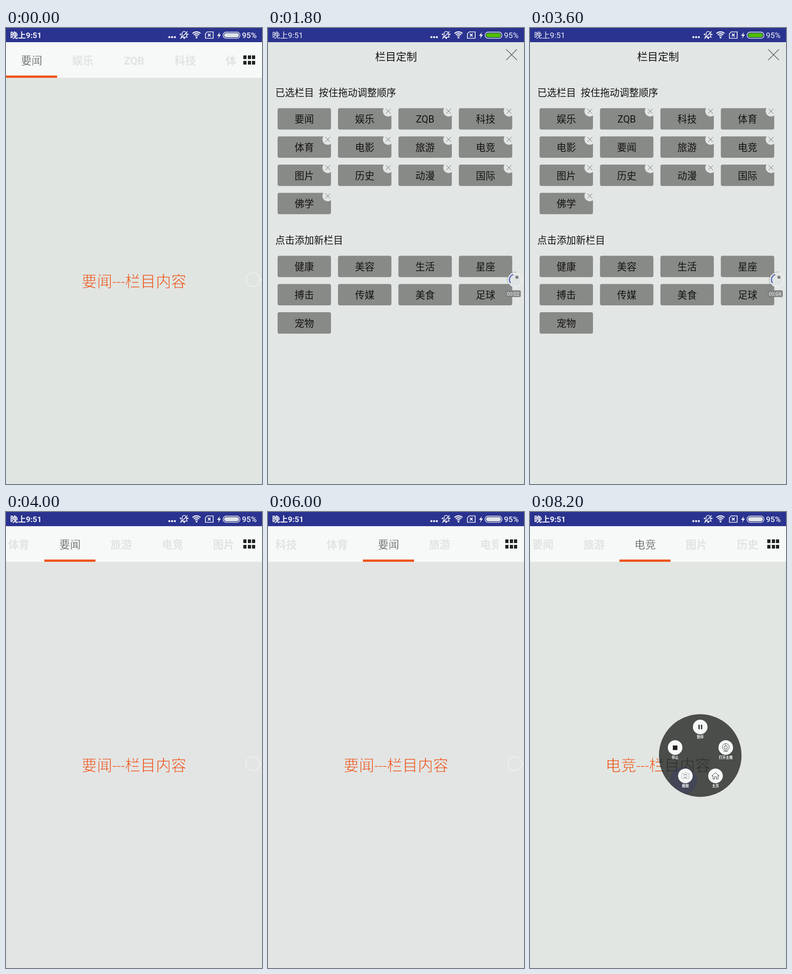
Animation of 561 by 998 pixels, one loop 8.4 s. Source, as an HTML page with a canvas:

```html
<!DOCTYPE html>
<html lang="zh-CN">
<head>
<meta charset="utf-8">
<title>栏目定制</title>
<style>
html, body { margin: 0; width: 100%; height: 100%; overflow: hidden; background: #e1e6e2; }
canvas { display: block; width: 561px; height: 998px; }
</style>
</head>
<body>
<canvas id="stage"></canvas>
<script>
const W = 561, H = 998, LOOP = 8400, STEP = 200;
const FONT = 'Roboto, "Noto Sans CJK SC", "Noto Sans CJK", sans-serif';
const ORANGE = '#ef551a', NAVY = '#2a338f', TILE = '#888a87', PANEL = '#e2e6e4', HEADER = '#f6f9f8';
const TAB = W / 5, STRIP = 505;

const chosen = '要闻 娱乐 ZQB 科技 体育 电影 旅游 电竞 图片 历史 动漫 国际 佛学'.split(' ');
const extra = '健康 美容 生活 星座 搏击 传媒 美食 足球 宠物'.split(' ');
const MOVED = chosen[0], REMOVED = chosen[5], DROP = 5;
const sorted = [...chosen.slice(1, DROP + 1), MOVED, ...chosen.slice(DROP + 1)];
const trimmed = sorted.filter(n => n !== REMOVED);

// [time, tab index] of each tab selection after the panel closes
const picks = [[4100, 4], [4750, 3], [5350, 2], [5843, 4], [6300, 5], [6700, 6]];

const canvas = document.getElementById('stage');
const dpr = window.devicePixelRatio || 1;
canvas.width = W * dpr;
canvas.height = H * dpr;
const c = canvas.getContext('2d');

const clamp = x => Math.max(0, Math.min(1, x));
const easeOut = x => 1 - (1 - clamp(x)) ** 3;
const smooth = x => (1 - Math.cos(Math.PI * clamp(x))) / 2;
const mix = (a, b, k) => a + (b - a) * k;

function rect(x, y, w, h, fill) {
  c.fillStyle = fill;
  c.fillRect(x, y, w, h);
}

function round(x, y, w, h, r, fill) {
  c.beginPath();
  c.roundRect(x, y, w, h, r);
  c.fillStyle = fill;
  c.fill();
}

function disc(x, y, r, fill) {
  c.beginPath();
  c.arc(x, y, r, 0, 7);
  c.fillStyle = fill;
  c.fill();
}

function ring(x, y, r, color, width = 1, from = 0, to = 2 * Math.PI) {
  c.beginPath();
  c.arc(x, y, r, from, to);
  c.strokeStyle = color;
  c.lineWidth = width;
  c.stroke();
}

function trace(points, close) {
  c.beginPath();
  points.forEach(([x, y]) => c.lineTo(x, y));
  if (close) c.closePath();
}

function line(points, color, width = 1, close) {
  trace(points, close);
  c.strokeStyle = color;
  c.lineWidth = width;
  c.stroke();
}

function cross(x, y, r, color, width) {
  line([[x - r, y - r], [x + r, y + r]], color, width);
  line([[x + r, y - r], [x - r, y + r]], color, width);
}

// y is the middle of the glyphs
function text(str, x, y, size, color, weight = 400, align = 'center') {
  c.font = `${weight} ${size}px ${FONT}`;
  c.textAlign = align;
  c.fillStyle = color;
  c.fillText(str, x, y + size * 0.37);
}

// thins the strokes by outlining them in the background colour
function thinText(str, x, y, size, color, bg) {
  text(str, x, y, size, color);
  c.strokeStyle = bg;
  c.lineWidth = size * 0.025;
  c.lineJoin = 'round';
  c.strokeText(str, x, y + size * 0.37);
  c.lineJoin = 'miter';
}

function statusIcons(green) {
  const ink = '#f1f3f7', weight = green ? 400 : 700;
  text('晚上9:51', 9, 15.5, 17.3, ink, weight, 'left');
  for (const x of [358, 364, 370]) disc(x, 20, 2.3, ink);

  c.beginPath();
  c.moveTo(384, 20);
  c.quadraticCurveTo(386, 18, 386, 13);
  c.arc(390.5, 12, 4.5, Math.PI, 0);
  c.quadraticCurveTo(395, 18, 397, 20);
  c.closePath();
  c.strokeStyle = ink;
  c.lineWidth = 1.6;
  c.stroke();
  disc(390.5, 22, 2, ink);
  line([[382, 23.5], [398, 7.5]], ink, 1.7);
  disc(382.5, 14, 1.8, ink);
  disc(398, 14, 1.8, ink);

  for (const r of [4.5, 8.5, 12.5]) ring(417.5, 21, r, ink, 2.3, -2.35, -0.8);
  disc(417.5, 21, 2, ink);

  line([[441, 8.5], [454, 8.5], [454, 22.5], [437, 22.5], [437, 12.5]], ink, 1.7, true);
  cross(445.5, 15.5, 3, ink, 2);

  trace([[469, 9], [462.5, 17], [466.5, 17], [464.5, 23.5], [471, 14.5], [467, 14.5]], true);
  c.fillStyle = ink;
  c.fill();

  c.beginPath();
  c.roundRect(475.7, 9, 37, 13.6, 6.5);
  c.strokeStyle = ink;
  c.lineWidth = 1.4;
  c.stroke();
  round(478, 11.2, 32.4, 9.2, 4.5, green ? '#4fbd00' : '#e1e5e6');
  text('95%', 517, 15.5, 17.3, ink, green ? 400 : 500, 'left');
}

function contentText(name, color, bg) {
  thinText(name + '---栏目内容', W / 2, 555, 33.7, color, bg);
}

function mainPage(tabs, index, scroll, bg) {
  rect(0, 0, W, H, bg);
  rect(0, 31, W, 78, HEADER);
  c.save();
  c.beginPath();
  c.rect(0, 31, STRIP, 78);
  c.clip();
  tabs.forEach((name, i) => {
    const x = (i + 0.5) * TAB - scroll;
    if (i === index) thinText(name, x, 71, 23.4, '#434645', HEADER);
    else text(name, x, 71, 23.4, '#e0e4e2', 700);
  });
  rect(Math.round(index * TAB - scroll), 104, 112, 5, ORANGE);
  c.restore();
  for (const x of [520, 530, 539]) for (const y of [60, 72]) rect(x, y, 7, 8, '#202323');
  contentText(tabs[index], ORANGE, bg);
  rect(0, 0, W, 31, NAVY);
}

const slot = (i, top) => [21 + (i % 4) * 132.4, top + Math.floor(i / 4) * 61.8];

function tile(name, [x, y], badge) {
  round(x, y, 117, 46.8, 4, TILE);
  text(name, x + 58.5, y + 23.7, 21.2, '#111211');
  if (badge) {
    disc(x + 110, y + 6.7, 11.7, PANEL);
    cross(x + 110, y + 6.7, 5.3, '#666a68', 1);
  }
}

function chosenTiles(t) {
  const top = 175.4;
  if (t >= 3800) {
    trimmed.forEach((name, i) => tile(name, slot(i, top), name !== MOVED));
    return;
  }
  const shift = smooth((t - 2600) / 600), drag = smooth((t - 2000) / 1000);
  const between = (a, b, k) => {
    const p = slot(a, top), q = slot(b, top);
    return [mix(p[0], q[0], k), mix(p[1], q[1], k)];
  };
  chosen.forEach((name, i) => {
    if (i) tile(name, i <= DROP ? between(i, i - 1, shift) : slot(i, top), true);
  });
  const [x, y] = between(0, DROP, drag);
  const held = t >= 2000 && t < 3400;
  c.save();
  if (held) {
    c.globalAlpha = 0.85;
    c.translate(x + 58.5, y + 23.4);
    c.scale(1.08, 1.08);
    c.translate(-x - 58.5, -y - 23.4);
  }
  tile(MOVED, [x, y], false);
  c.restore();
}

function panel(t, offset) {
  const rise = t >= 3800 ? 61.8 : 0;
  c.save();
  c.translate(0, offset);
  rect(0, 0, W, H, PANEL);
  rect(0, 0, W, 31, NAVY);
  text('栏目定制', W / 2, 63, 22.9, '#111211');
  cross(533.7, 58.5, 11.8, '#555957', 1.3);
  text('已选栏目  按住拖动调整顺序', 16, 141, 21.2, '#111211', 400, 'left');
  chosenTiles(t);
  text('点击添加新栏目', 16, 464 - rise, 21.2, '#111211', 400, 'left');
  const rest = rise ? [...extra, REMOVED] : extra;
  rest.forEach((name, i) => tile(name, slot(i, 498.5 - rise), false));
  c.restore();
}

function recorder(t) {
  const x = 541, y = 551;
  const clock = '00:' + String(Math.floor(t / 900)).padStart(2, '0');
  if (t < 800) {
    disc(x, y, 15, '#36489a');
    ring(x, y, 15, '#a2a49f', 3);
    disc(x + 4.5, y - 5, 3.2, '#2b2f4c');
    trace([[553, 551], [559, 545], [559, 557]], true);
    c.fillStyle = '#a2a49f';
    c.fill();
    text(clock, 537, 582, 11, '#999b98');
    return;
  }
  ring(x, y, 16.5, 'rgba(110,114,112,.4)', 2, 2.2, 5);
  disc(x, y, 15, '#e0e4e4');
  ring(x, y, 12, '#5b66b8', 2.5, 2.5, 4.4);
  c.setLineDash([4, 2]);
  ring(x, y, 15, '#f4f6f6', 2.2);
  c.setLineDash([]);
  rect(x + 1.5, y - 8.5, 6, 6, '#777b7b');
  round(520.5, 574, 33.5, 15, 3, 'rgba(125,128,126,.9)');
  text(clock, 537, 581.7, 11, '#f2f4f3');
}

function ghost() {
  ring(541, 551, 15.3, 'rgba(255,255,255,.55)', 1.5);
  trace([[556, 551], [559, 548], [559, 554]], true);
  c.fillStyle = 'rgba(255,255,255,.55)';
  c.fill();
}

function menuButton(x, y, label, icon) {
  disc(x, y, 16, '#f7f9f8');
  c.save();
  c.translate(x, y);
  icon();
  c.restore();
  text(label, x, y + 22, 7.5, '#fff', 700);
}

function menu(scale, name) {
  const x = 373, y = 533, ink = '#3c3f3d', shade = '#4a4d4a';
  c.save();
  c.translate(x, y);
  c.scale(scale, scale);
  c.translate(-x, -y);
  disc(x, y, 90.5, shade);
  c.clip();
  contentText(name, '#30322f', shade);
  disc(336, 588, 30, 'rgba(48,54,112,.3)');
  menuButton(373, 470.5, '暂停', () => {
    rect(-4, -5, 3, 10, ink);
    rect(1.5, -5, 3, 10, ink);
  });
  menuButton(318, 515.5, '停止', () => rect(-5, -4.5, 10, 10, '#222'));
  menuButton(429, 515.5, '打开主播', () => {
    ring(0, -1, 7.5, ink);
    ring(0, 0, 3.5, ink);
    disc(0, -5, 1, ink);
    line([[-5, 8.5], [5, 8.5]], ink);
  });
  menuButton(340.5, 577.5, '截图', () => {
    line([[-8, -5], [-3, -5], [-2, -7], [3, -7], [4, -5], [8, -5], [8, 6], [-8, 6]], '#a5a8a6', 0.8, true);
    ring(0, 0.5, 3.5, ink, 1, 0.4, 2.8);
    ring(0, 0.5, 3.5, ink, 1, 3.5, 5.9);
  });
  menuButton(406.5, 577.5, '主页', () =>
    line([[-8, 0], [0, -7], [8, 0], [5.5, 0], [5.5, 7], [2, 7], [2, 2], [-2, 2], [-2, 7], [-5.5, 7], [-5.5, 0]], ink, 1, true));
  c.restore();
}

function afterPanel(t) {
  let scroll = (DROP + 0.5) * TAB - STRIP / 2, index = 4;
  for (const [start, i] of picks) {
    if (t < start) break;
    scroll = mix(scroll, (i + 0.5) * TAB - STRIP / 2, easeOut((t - start) / 250));
    index = i;
  }
  mainPage(trimmed, index, scroll, t < 8000 ? '#e3e5e4' : '#e1e6e2');
  statusIcons(false);
  if (t < 8000) ghost();
  else menu(t < 8200 ? 0.55 : 1, trimmed[index]);
}

function draw(t) {
  c.setTransform(dpr, 0, 0, dpr, 0, 0);
  if (t < 400) {
    mainPage(chosen, 0, 0, '#e0e5e1');
    statusIcons(false);
    ghost();
  } else if (t < 4000) {
    rect(0, 0, W, H, '#000');
    panel(t, t < 800 ? -H * (1 - smooth((t - 380) / 495)) : 0);
    statusIcons(true);
    recorder(t);
  } else {
    afterPanel(t);
  }
}

function tick(now) {
  draw(Math.floor((now % LOOP) / STEP) * STEP);
  requestAnimationFrame(tick);
}
requestAnimationFrame(tick);
</script>
</body>
</html>
```
